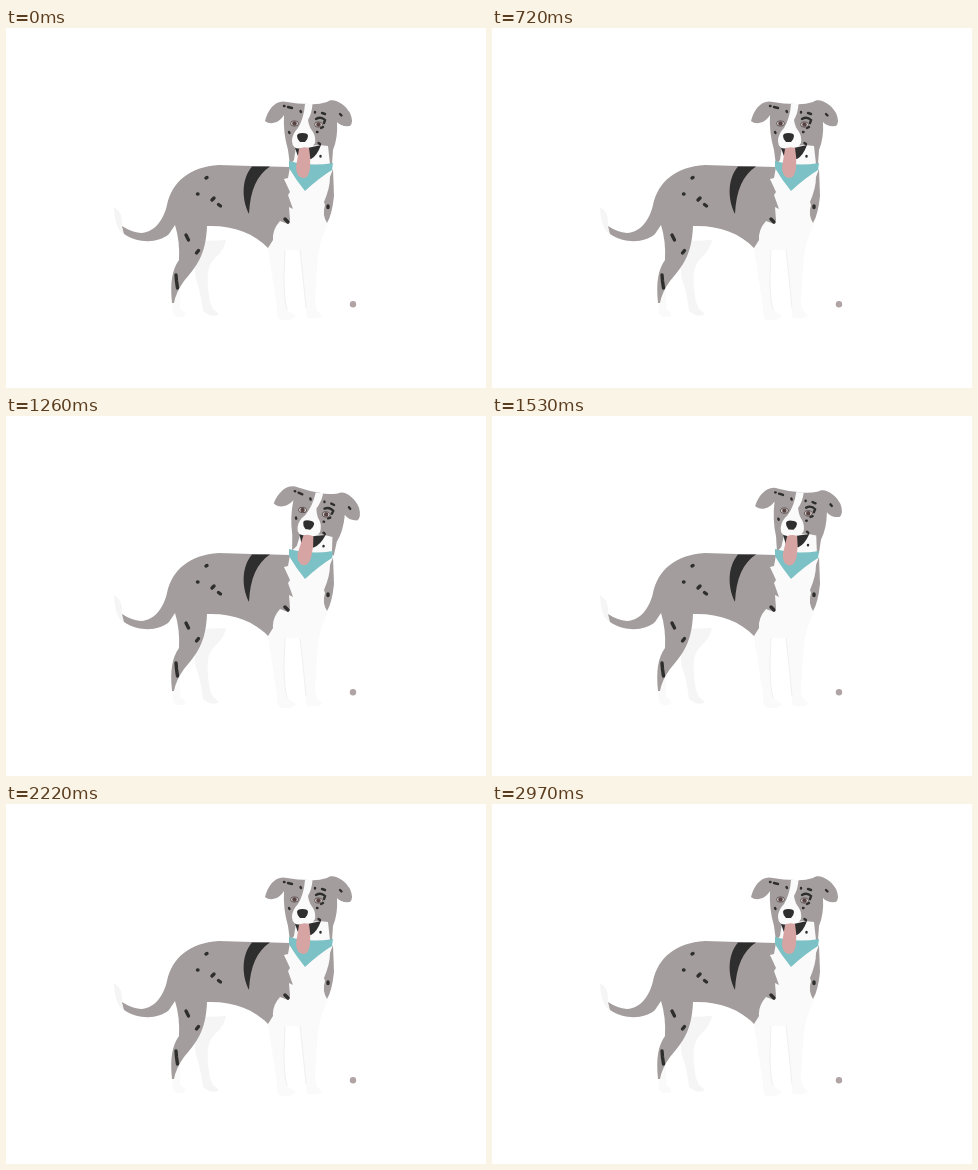
Animation, 480 px wide and 360 px high, one loop 3600 ms. Source, as an HTML page:

```html
<!DOCTYPE html>
<html lang="en">
<head>
<meta charset="utf-8">
<title>Dog tilting its head</title>
<style>
html, body { margin: 0; width: 100%; height: 100%; overflow: hidden; background: #fff; }
svg { display: block; width: 100vw; height: 100vh; }
.grey { fill: #a49d9d; }
.white { fill: #fafafa; }
.far { fill: #f5f5f5; }
.dark { fill: #2f2e2e; }
.spots { fill: none; stroke: #2f2e2e; stroke-linecap: round; stroke-width: 3.4; }
.head .spots { stroke-width: 2.4; }
</style>
</head>
<body>
<svg viewBox="0 0 480 360">
  <!-- legs and chest -->
  <path class="far" d="M198 213L220 212Q218 222 210 229C201 237 201 247 202 259Q203 275 207 281L213 286Q210 289 203 287L197 283Q195 265 190 251C187 239 191 228 198 213Z"/>
  <path class="white" d="M166 274L167 285Q169 290 174 289Q181 289 179 285L174 281L174 262L167 260Z"/>
  <path class="white" d="M283 139H327L328 168Q326 190 317 207Q312 220 311 241L309 273Q309 283 316 287Q314 292 301 290Q299 287 300 280L297 249L294 222H279L278 248Q278 272 281 282L290 288Q288 293 275 292Q270 290 271 280L265 240L261 216L270 194Z"/>
  <path fill="none" stroke="#f0f0f0" d="M279 222L278 248Q278 272 281 282M294 222L297 249L300 280"/>

  <!-- tail, body, thigh -->
  <path class="far" d="M108 179Q117 184 116 197L119 206Q109 204 108 179Z"/>
  <path class="grey" d="M284 139L245 138L213 137C183 139 166 154 161 177C158 190 150 204 135 205Q125 204 116 198L118 206C133 216 153 215 163 206L169 197Q174 213 173 232C166 242 164 254 166 275H168Q170 264 178 253C191 238 200 226 201 198C226 197 248 205 262 220L267 212Q266 202 274 193L282 196L284 192L283 179L287 181L282 167L284 164L278 151L282 150Z"/>
  <path class="grey" d="M327 141L328 168Q326 187 321 195Q316 187 319 177L318 174Q324 160 324 149Z"/>
  <path class="dark" d="M246 138.500H264C251 147 244 162 243 186C235 170 236 150 246 138.500Z"/>
  <path class="spots" d="M200 150l1-.5M191.500 166h.5M208 170l-2 2M212.500 176.500l2 1.500M180 207l2.500 5M190.500 225l2-2.500M170 247l.5 6l1 7M279 191l3 3M322 178v1.500"/>

  <!-- neck and head -->
  <g class="head">
    <path class="white" d="M284 115H325V141H284Z"/>
    <path class="grey" d="M281 74C270 71 262 81 259 93C265 98 274 94 278 87Q277 105 282 122L284 137L288 132L290 119L313 117L322 118L324 136H326L327 122Q332 110 331 94Q335 99 344 98Q348 94 344 85C339 76 327 69 321 74Q311 77 303 76Q291 76 281 74Z"/>
    <path class="white" d="M299 76H306.500Q306 85 302 92Q303 99 307 104Q310 109 309 115Q306 121 296 122Q286 121 286 113Q286 106 292 100Q298 90 299 76Z"/>
    <path class="dark" d="M289 120Q297 122 306 119L315 117Q311 128 305 131H293Z"/>
    <path class="dark" d="M291 108Q291 105 296.500 105Q302 105 302 108Q302 111 299 114H294Q291 111 291 108Z"/>
    <path class="spots" d="M282 79l4 1M278 78h.5M294.500 83l.5 1M310 91q5-3 9 1l-1 3M316 85l3 1M317 99l-2 1M283 104l.5 1M311 104h.5M309 84v.5M334 86l1.500 1.500M314.500 128v.5M312.500 115l1.500 1"/>
    <g fill="#d2c9c5" stroke="#4b4444" stroke-width=".8">
      <ellipse cx="288.500" cy="95.500" rx="4" ry="2.700"/>
      <ellipse cx="312.500" cy="96.500" rx="4" ry="2.700"/>
    </g>
    <g fill="#574343">
      <circle cx="288.500" cy="95.500" r="2.200"/>
      <circle cx="312.500" cy="96.500" r="2.200"/>
    </g>
  </g>

  <path fill="#7cc1c5" d="M283 133Q304 139 327 135L326 142Q313 150 299 163Q290 152 283 140Z"/>
  <path class="head" fill="#d6a4a2" d="M293 121Q297 118 303 120Q305 130 304 140Q303 150 297 150Q290 149 290 139Z"/>
  <circle cx="347" cy="276.300" r="3.200" fill="#b0a4a5"/>
</svg>
<script>
const LOOP = 3600, START = 990, END = 1690, TILT = 9.5;
const parts = document.querySelectorAll(".head");

function draw(now) {
  const t = now % LOOP;
  const p = Math.min(1, Math.max(0, (t - START) / (END - START)));
  const angle = TILT * Math.sin(Math.PI * p) ** 2;
  for (const part of parts) part.setAttribute("transform", `rotate(${angle} 303 150)`);
  requestAnimationFrame(draw);
}
draw(performance.now());
</script>
</body>
</html>
```
